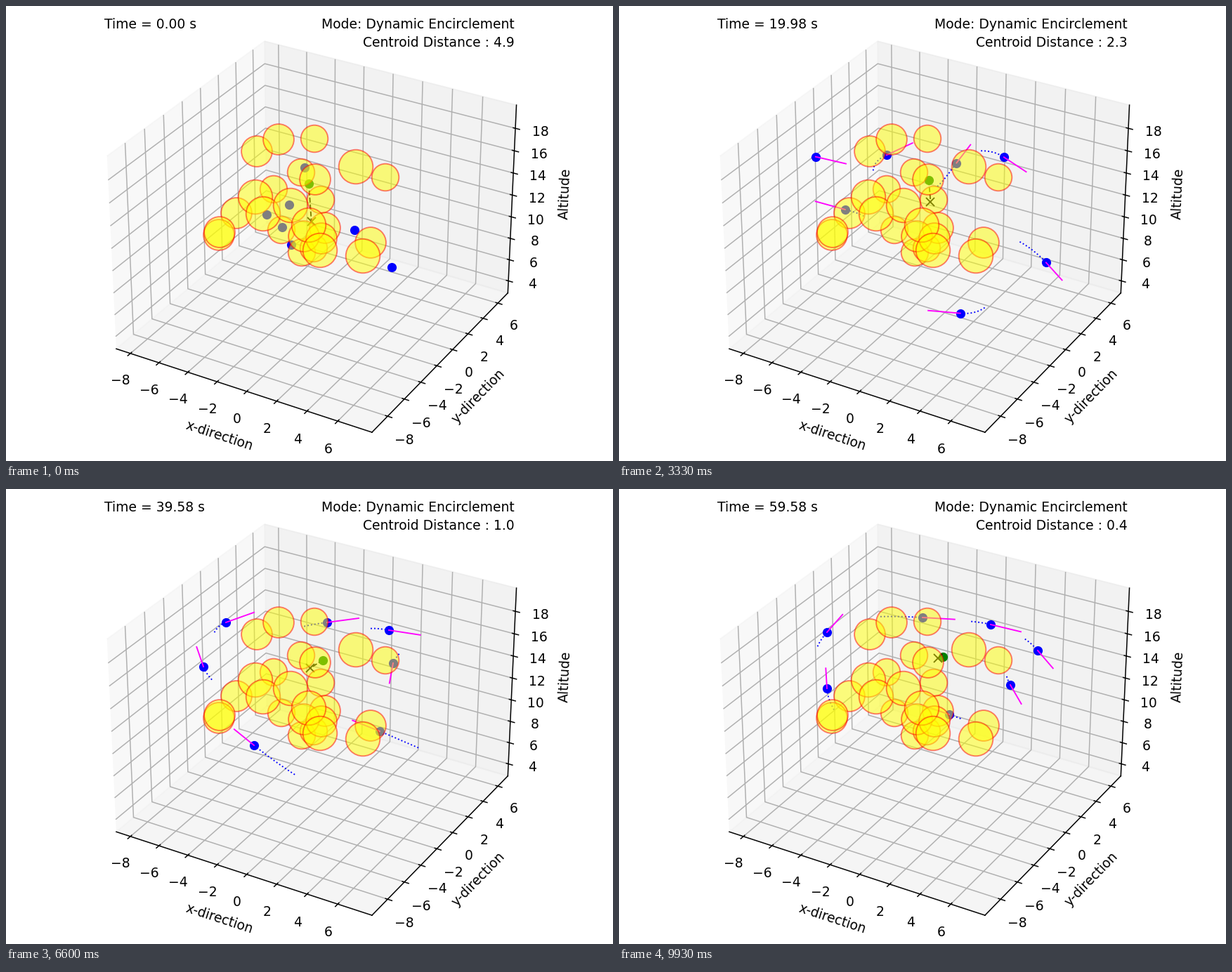
These frames come from a looping animation (864 by 648 pixels, 9990 ms). A matplotlib script:

```python
import numpy as np
import matplotlib.pyplot as plt
from matplotlib.animation import FuncAnimation
from matplotlib.patches import Circle

W, H, DPI = 864, 648, 135
FRAMES, LOOP_MS = 150, 9990
TRAIL = 20  # frames of history behind each agent

# Waypoints of the seven agents on screen, joined by smooth curves
KEYS = np.array([0, 26, 65, 99, 149])
WAYPOINTS = np.array([
    [(371, 297), (285, 226), (291, 214), (313, 190), (432, 183)],
    [(393, 315), (362, 242), (403, 203), (457, 190), (529, 193)],
    [(403, 283), (447, 262), (500, 204), (545, 201), (596, 230)],
    [(425, 230), (506, 207), (560, 226), (551, 248), (557, 279)],
    [(496, 319), (562, 332), (614, 378), (532, 345), (470, 321)],
    [(549, 372), (526, 425), (452, 429), (353, 365), (296, 284)],
    [(406, 340), (355, 303), (306, 283), (281, 253), (296, 204)],
], float).swapaxes(0, 1)

# Obstacle centres by radius
OBSTACLES = {
    20.2: [(439, 189), (540, 244), (420, 237), (381, 261), (448, 276),
           (392, 319), (421, 351), (438, 345)],
    22.8: [(357, 207), (388, 190), (440, 247), (328, 295), (303, 326),
           (304, 322), (454, 316), (424, 328), (449, 331), (519, 337)],
    25.2: [(498, 229), (355, 272), (366, 296), (405, 284), (431, 312),
           (447, 348), (508, 356)],
}

SLOPES = np.gradient(WAYPOINTS, KEYS, axis=0, edge_order=2)


def agents_at(n):
    """Agent positions at frame n, on cubic Hermite curves."""
    i = np.clip(np.searchsorted(KEYS, n, side="right") - 1, 0, len(KEYS) - 2)
    h = KEYS[i + 1] - KEYS[i]
    s = (n - KEYS[i]) / h
    return ((1 + 2 * s) * (1 - s) ** 2 * WAYPOINTS[i]
            + s * (1 - s) ** 2 * h * SLOPES[i]
            + s ** 2 * (3 - 2 * s) * WAYPOINTS[i + 1]
            + s ** 2 * (s - 1) * h * SLOPES[i + 1])


def headings_at(n):
    """Direction of motion, foreshortened vertically by the tilted view."""
    v = agents_at(n + 0.5) - agents_at(n - 0.5)
    return 46 * v / np.hypot(v[:, :1], 1.6 * v[:, 1:])


def distance_at(n):
    return np.interp(n, [0, 26, 50, 73, 99, 129, 149],
                     [4.9, 3.2, 2.3, 1.6, 1.0, 0.7, 0.4])


fig = plt.figure(figsize=(W / DPI, H / DPI), dpi=DPI)

ax = fig.add_axes([0, 0, 1, 1], projection="3d")
ax.view_init(30, -60)
HALF = 8.6
for name, centre, ticks in (("x", -0.40, range(-8, 7, 2)),
                            ("y", -1.23, range(-8, 7, 2)),
                            ("z", 11.45, range(4, 19, 2))):
    ax.set(**{f"{name}lim": (centre - HALF, centre + HALF),
              f"{name}ticks": ticks})
ax.set(xlabel="x-direction", ylabel="y-direction", zlabel="Altitude")

# Flat layer in pixel coordinates, y downwards
top = fig.add_axes([0, 0, 1, 1])
top.set(xlim=(0, W), ylim=(H, 0))
top.axis("off")

time_text = top.text(140.4, 32.4, "")
top.text(723.6, 32.4, "Mode: Dynamic Encirclement", ha="right")
dist_text = top.text(723.6, 58.3, "", ha="right")


def line(style, **kw):
    return top.plot([], [], style, lw=1, ms=6, **kw)[0]


count = WAYPOINTS.shape[1]
trails = [line("b:") for _ in range(count)]
dots = line("bo")
arrows = [line("-", color="magenta") for _ in range(count)]
link = line("k--")
target = line("o", color="green")
centroid = line("kx")

for radius, centres in OBSTACLES.items():
    for xy in centres:
        top.add_patch(Circle(xy, radius - 0.9, fc="yellow", ec="red",
                             lw=1, alpha=0.5, zorder=3))


def update(n):
    pos = agents_at(n)
    tips = pos + headings_at(n) * (n > 0)
    past = np.array([agents_at(t)
                     for t in np.linspace(max(0, n - TRAIL), n, 41)])

    dots.set_data(*pos.T)
    for k in range(count):
        trails[k].set_data(*past[:, k].T)
        arrows[k].set_data(*zip(pos[k], tips[k]))

    goal = np.array([431 + 0.2 * n, 253 - 0.094 * n])
    mean = pos.mean(axis=0) - (0, 1)
    target.set_data(*goal[:, None])
    centroid.set_data(*mean[:, None])
    link.set_data(*zip(goal, mean))

    time_text.set_text(f"Time = {max(0, 0.4 * n - 0.02):.2f} s")
    dist_text.set_text(f"Centroid Distance : {distance_at(n):.1f}")
    return []


anim = FuncAnimation(fig, update, frames=FRAMES, interval=LOOP_MS / FRAMES,
                     repeat=True, repeat_delay=0, blit=False)

plt.show()
```
